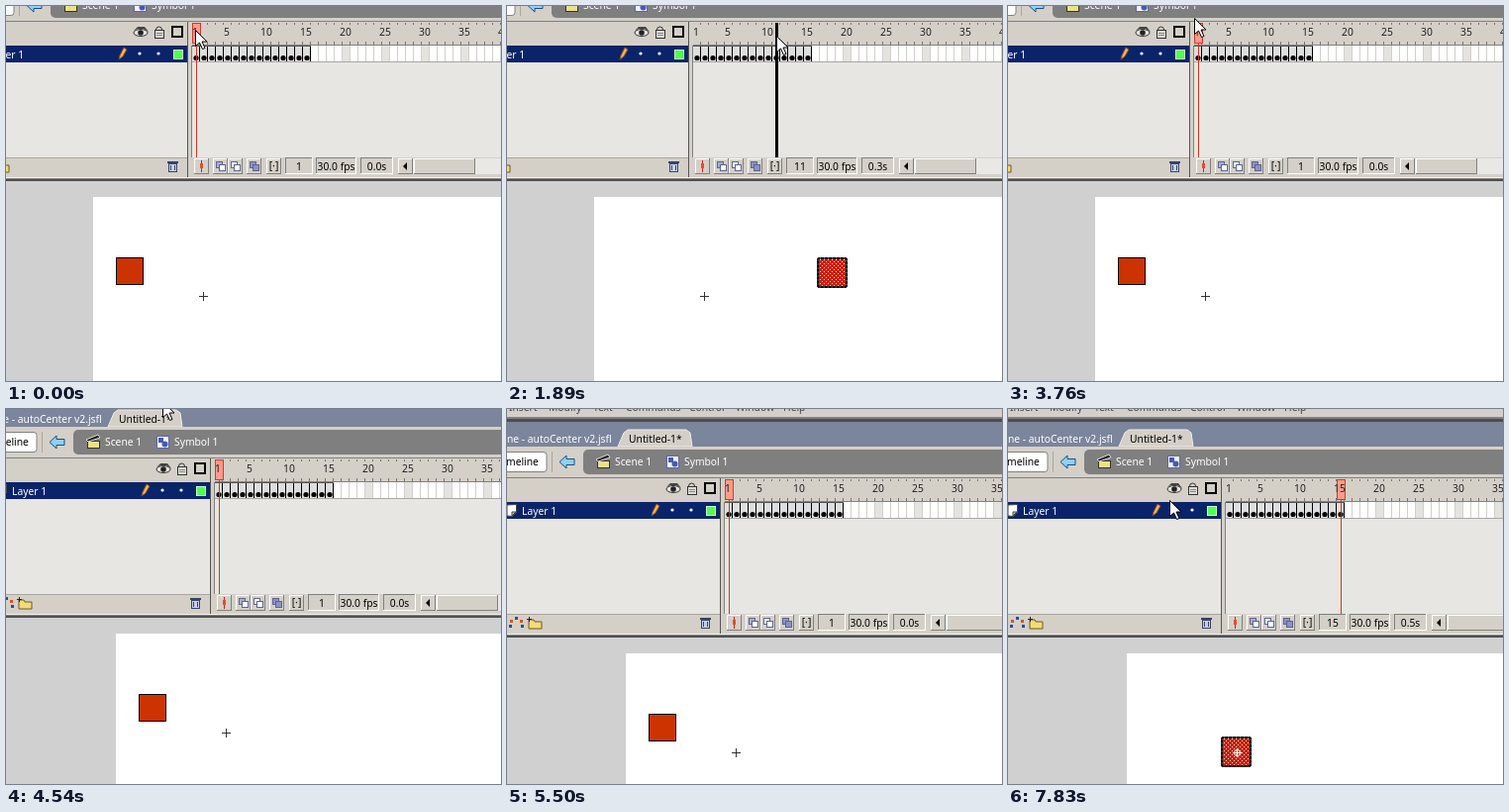
Recreate the animation shown at these times as an HTML page with a canvas. Size 500 px wide and 379 px high, loop 8 s.

```html
<!DOCTYPE html>
<html lang="en">
<head>
<meta charset="utf-8">
<title>Timeline scrub</title>
<style>
html, body { margin: 0; width: 100%; height: 100%; overflow: hidden; background: #d0d0d0; }
canvas { display: block; }
</style>
</head>
<body>
<canvas id="stage" width="500" height="379"></canvas>
<script>
const c = document.getElementById('stage').getContext('2d');
const FACE = '#d4d0c8', NAVY = '#0a246a', PALE = '#e8e6e2', RED = '#cc3300';
const LOOP = 8000, CELL = 8, KEYS = 15;

// Centre of the square on each key frame
const path = [[157,322],[188,350],[228,380],[275,376],[318,365],[342,354],[307,399],[232,415],
  [161,399],[232,364],[361,324],[370,374],[292,415],[192,404],[161,364]];

const items = ['Manage Saved Commands...', 'Get More Commands...', 'Run Command...',
  '!mine - add20frames', '!mine - autoCenter v2', '!mine - automaticDebris',
  '!mine - createYmovement', '!mine - new default project',
  '!mine - ss color correction (SPECIFIC)', 'RHY2Cellmark', 'norbel - mass bitmap tracer',
  'finn satley - NewerAnimClip', 'finn corder - BreakIntoLayers', 'finn corder - drawGuide',
  'finn corder - frameEdit', 'finn corder - frameExtender', 'finn corder - NewAnimClip',
  'finn corder - Search and Replace', 'finn corder - Glide2Poses', 'Cells2VEC',
  'Cells2Object', 'CellsArranger'];

const cellX = n => 220 + CELL * (n - 1);
const itemY = i => i < 3 ? 18 + 17 * i : 77 + 16.8 * (i - 3);
const mix = (a, b, p) => a + (b - a) * p;
// Index of the latest of `count` even steps; -1 before the first
const stepAt = (t, from, to, count) =>
  t < from ? -1 : Math.min(count - 1, Math.floor((t - from) / (to - from) * (count - 1) + 0.001));

function rect(x, y, w, h, fill, line) {
  c.fillStyle = fill;
  c.fillRect(x, y, w, h);
  if (line) { c.strokeStyle = line; c.lineWidth = 1; c.strokeRect(x + .5, y + .5, w - 1, h - 1); }
}
function poly(points, fill, line) {
  c.beginPath();
  for (let i = 0; i < points.length; i += 2) c.lineTo(points[i], points[i + 1]);
  c.closePath();
  if (fill) { c.fillStyle = fill; c.fill(); }
  if (line) { c.strokeStyle = line; c.lineWidth = 1; c.stroke(); }
}
function dot(x, y, r, fill) {
  c.beginPath();
  c.arc(x, y, r, 0, 7);
  c.fillStyle = fill;
  c.fill();
}
function text(s, x, y, fill = '#000', align = 'left') {
  c.font = '10.3px "Noto Sans", sans-serif';
  c.textAlign = align;
  c.fillStyle = fill;
  c.fillText(s, x, y);
}
function bevel(x, y, w, h, sunken) {
  rect(x, y, w, h, FACE);
  const [a, b] = sunken ? ['#808080', '#fff'] : ['#fff', '#808080'];
  rect(x, y, w, 1, a); rect(x, y, 1, h, a);
  rect(x, y + h - 1, w, 1, b); rect(x + w - 1, y, 1, h, b);
}
function round(x, y, w, h, r, fill, line) {
  c.beginPath();
  c.roundRect(x, y, w, h, r);
  c.fillStyle = fill;
  c.fill();
  if (line) { c.strokeStyle = line; c.lineWidth = 1; c.stroke(); }
}
function cross(x, y, r, fill) {
  rect(x - r, y, 2 * r + 1, 1, fill);
  rect(x, y - r, 1, 2 * r + 1, fill);
}

function topBars() {
  rect(0, -20, 560, 29, FACE);
  [['Insert', 2], ['Modify', 42], ['Text', 87], ['Commands', 120], ['Control', 184],
    ['Window', 231], ['Help', 279]].forEach(([s, x]) => text(s, x, 2, '#444'));
  rect(0, 8, 560, 2, '#808080');
  rect(0, 10, 560, 3, '#4c4c54');
  rect(0, 13, 560, 25, '#7b859c');
  text('ne - autoCenter v2.jsfl', 0, 34, '#fff');
  poly([112, 38, 118, 24, 122, 21, 181, 21, 185, 24, 187, 38], FACE, '#f0eee8');
  text('Untitled-1*', 123, 34);

  rect(0, 38, 560, 32, FACE);
  round(-20, 43.5, 60, 20, 3, '#fff', '#808080');
  text('meline', -1, 57);
  rect(45, 43, 1, 21, '#aaa69e');
  poly([53, 53.5, 60, 47, 60, 50.5, 68, 50.5, 68, 56.5, 60, 56.5, 60, 60], '#8fd0f4', '#174f86');
  round(77, 41, 500, 25, 5, '#7f7f7f');
  rect(91, 52, 13, 8, '#eee08a', '#333');
  poly([90, 51, 102, 46, 104, 49, 92, 53], '#222', '#ddd');
  text('Scene 1', 109, 57, '#fff');
  rect(161, 47, 13, 13, '#f4f6ff', '#5a68a8');
  rect(163, 49, 5, 5, '#465bb0');
  dot(169.5, 55.5, 3, '#465bb0');
  text('Symbol 1', 179, 57, '#fff');
}

function layers() {
  rect(0, 69, 560, 1, '#808080');
  rect(0, 70, 216, 24, FACE);
  c.beginPath();
  c.ellipse(168, 81, 7, 3.5, 0, 0, 7);
  c.fillStyle = '#e8e6e0'; c.fill();
  c.strokeStyle = '#333'; c.lineWidth = 1; c.stroke();
  dot(168, 81, 2.8, '#222');
  poly([161, 79, 165, 75, 172, 75, 176, 80, 171, 77, 165, 77], '#444');
  c.beginPath(); c.arc(186.5, 78, 3, Math.PI, 0); c.stroke();
  rect(182, 78, 10, 9, '#dedcd4', '#333');
  rect(184, 81, 6, 1, '#888'); rect(184, 83, 6, 1, '#888');
  c.lineWidth = 2; c.strokeStyle = '#000'; c.strokeRect(200, 75, 10, 10);

  rect(0, 94, 215, 17, NAVY);
  poly([0, 97, 9.5, 96.5, 9.5, 104.5, 5.5, 108.5, 0, 108], '#fff', '#444');
  poly([5, 108, 5, 104, 9, 104], '#c8c8c8', '#444');
  text('Layer 1', 15, 107, '#fff');
  poly([146, 108, 147, 104, 151, 96, 154, 98, 150, 105], '#f3b45c', '#8a4a20');
  dot(167, 102, 1.6, '#fff'); dot(186, 102, 1.6, '#fff');
  rect(201, 98, 10, 10, '#4fff4f', '#c8ffc8');
  rect(0, 111, 215, 96, PALE);

  rect(0, 207, 560, 21, FACE);
  rect(0, 207, 215, 1, '#aaa69e');
  [[3, 219], [4, 214], [9, 211], [14, 214], [15, 219]].forEach(([x, y], i) =>
    rect(x - 1, y - 1, 3, 3, i % 2 ? '#e05020' : '#2050a0'));
  poly([22, 213, 27, 213, 28, 215, 35, 215, 35, 222, 22, 222], '#f5da76', '#6c5a20');
  cross(22, 212, 2, '#222');
  rect(196, 213, 9, 9, '#c8d0e4', '#34446c');
  rect(195, 211, 11, 2, '#34446c');
  rect(198, 215, 1, 5, '#34446c'); rect(202, 215, 1, 5, '#34446c');
  rect(215, 70, 5, 158, FACE);
  rect(215, 70, 1, 158, '#555'); rect(219, 94, 1, 113, '#808080');
}

function frameGrid(n, scrub) {
  rect(220, 70, 340, 24, FACE);
  rect(220, 111, 340, 96, PALE);
  rect(220, 93, 340, 1, '#808080');
  for (let i = 1; i <= 42; i++) {
    const x = cellX(i), key = i <= KEYS;
    rect(x, 94, CELL, 17, key ? '#dedede' : i % 5 ? '#fff' : '#e4e3df');
    rect(x + 7, 94, 1, 17, key ? '#000' : '#d2d0cb');
    rect(x + 7, 71, 1, 2, '#77746e'); rect(x + 7, 90, 1, 3, '#77746e');
    if (key) dot(x + 4, 106.5, 2.6, '#000');
  }
  rect(220, 94, 120, 1, '#555');
  rect(220, 110, 340, 1, '#aaa8a2');
  const x = cellX(n);
  if (!scrub) {
    rect(x, 71, 9, 21, '#ff9b8c', '#d5382a');
    rect(x + 4, 92, 1, 115, '#d23520');
  }
  for (let i = 1; i <= 40; i++)
    if (i === 1 || i % 5 === 0) text(i, CELL * i + 215, 84, '#222', 'center');
  if (scrub) rect(x + 3, 71, 3, 136, '#000');
}

function statusBar(n) {
  for (const x of [222, 241, 256, 275, 295]) bevel(x, 208, 15, 16);
  rect(229, 210, 1, 12, '#d02010');
  rect(228, 213, 3, 5, '#e84a30');
  [[244, '#a9aed0', '#fff'], [259, '#fff', '#fff'], [278, '#8c92c4', '#8c92c4']].forEach(([x, a, b]) => {
    rect(x, 211, 7, 7, a, '#5c6494');
    rect(x + 3, 214, 7, 7, b, '#5c6494');
  });
  text('[·]', 302.5, 219, '#000', 'center');
  [[314, 28, n], [345, 41, '30.0 fps'], [390, 33, ((n - 1) / 30).toFixed(1) + 's']].forEach(([x, w, s]) => {
    bevel(x, 207, w, 17, true);
    text(s, x + w / 2, 219.5, '#000', 'center');
  });
  rect(428, 208, 140, 16, '#eae8e4');
  bevel(428, 208, 15, 16);
  poly([433, 216, 437, 212, 437, 220], '#000');
  bevel(444, 208, 62, 16);
  rect(0, 227, 560, 1, '#f4f2ee');
  rect(0, 228, 560, 1, '#808080');
  rect(0, 229, 560, 2, '#505050');
}

function square(x, y, selected) {
  if (!selected) return rect(x - 14, y - 14, 28, 28, RED, '#000');
  const l = x - 15, t = y - 15;
  round(l - 1, t - 1, 31, 31, 3, '#c9200c');
  c.fillStyle = '#f4d8d0';
  for (let j = 1; j < 29; j += 2)
    for (let i = 1 + j % 4; i < 29; i += 4) c.fillRect(l + i, t + j, 1, 1);
  c.beginPath();
  c.roundRect(l, t, 29, 29, 2);
  c.strokeStyle = '#000'; c.lineWidth = 2; c.stroke();
  c.setLineDash([1, 3]);
  c.strokeStyle = '#bbb'; c.lineWidth = 1; c.stroke();
  c.setLineDash([]);
}

function artwork(n, selected, centred) {
  rect(0, 231, 560, 220, '#d0d0d0');
  rect(120, 247, 440, 200, '#fff');
  if (!centred) cross(231, 347, 4, '#333');
  const [x, y] = centred ? [231, 347] : path[n - 1];
  square(x, y, selected);
  if (centred) {
    c.beginPath(); c.arc(231.5, 347.5, 3, 0, 7);
    c.strokeStyle = '#fff'; c.lineWidth = 1; c.stroke();
    cross(231, 347, 4, '#fff');
  }
}

function menu(alpha, pointerY) {
  c.globalAlpha = alpha;
  bevel(116, -14, 57, 20, true);
  text('Commands', 121, 3);
  rect(115, 6, 240, 380, FACE);
  rect(115, 6, 1, 380, '#f8f6f2'); rect(115, 6, 240, 1, '#f8f6f2');
  rect(353, 6, 1, 380, '#808080'); rect(354, 6, 1, 380, '#404040');
  rect(118, 64, 234, 1, '#808080'); rect(118, 65, 234, 1, '#fff');
  items.forEach((s, i) => {
    const y = itemY(i), hot = Math.abs(pointerY - y) < 8.3;
    if (hot) rect(117, Math.round(y) - 8, 235, 16, NAVY);
    text(s, 133, Math.round(y) + 4, hot ? '#fff' : '#000');
  });
  c.globalAlpha = 1;
}

function pointer(x, y) {
  c.save();
  c.translate(Math.round(x) + .5, Math.round(y) + .5);
  poly([0, 0, 0, 16, 4, 12.5, 7, 19, 9.5, 18, 6.5, 11.5, 11.5, 11.5], '#fff', '#000');
  c.restore();
}

function scene(t) {
  const drag = stepAt(t, 460, 3760, 36), pan = stepAt(t, 3840, 5500, 18),
    enter = stepAt(t, 5600, 5850, 4), open = stepAt(t, 6040, 6230, 3),
    hover = stepAt(t, 6720, 7520, 10), done = t >= 7830;
  const scrub = drag >= 0 && drag < 35;
  let n = 1;
  if (drag >= 0) n = Math.min(Math.floor(1.3 + (drag + 1) * .625), 36 - drag);
  if (done) n = KEYS;

  const left = 1 - (pan + 1) / 18;
  const dx = -Math.round(32 * left ** 2.2), dy = -Math.round(54 * left ** 1.7);

  let mx = 191, my = 24;
  if (hover >= 0) {
    [mx, my] = hover < 3 ? [147 + 5 * hover, 14 + 14 * hover]
      : [mix(157, 163, (hover - 2) / 7), mix(42, 92, (hover - 2) / 7)];
  } else if (enter >= 0) {
    mx = 142; my = -13 + 4 * enter;
  } else if (pan >= 0) {
    const p = (pan + 1) / 11;
    mx = mix(188, 147, Math.min(p, 1)); my = mix(12, -16, p);
  } else if (drag >= 0) {
    mx = scrub ? 192 + CELL * (n - 1) : 188;
    my = drag < 16 ? mix(24, 30, drag / 15) : mix(30, 12, (drag - 15) / 20);
  }

  c.save();
  c.translate(dx, dy);
  artwork(n, scrub || done, done);
  topBars();
  layers();
  frameGrid(n, scrub);
  statusBar(n);
  c.restore();
  if (open >= 0 && t < 7720) menu((open + 1) / 3, my);
  pointer(mx, my);
}

function tick(now) {
  scene(now % LOOP);
  requestAnimationFrame(tick);
}
requestAnimationFrame(tick);
</script>
</body>
</html>
```
